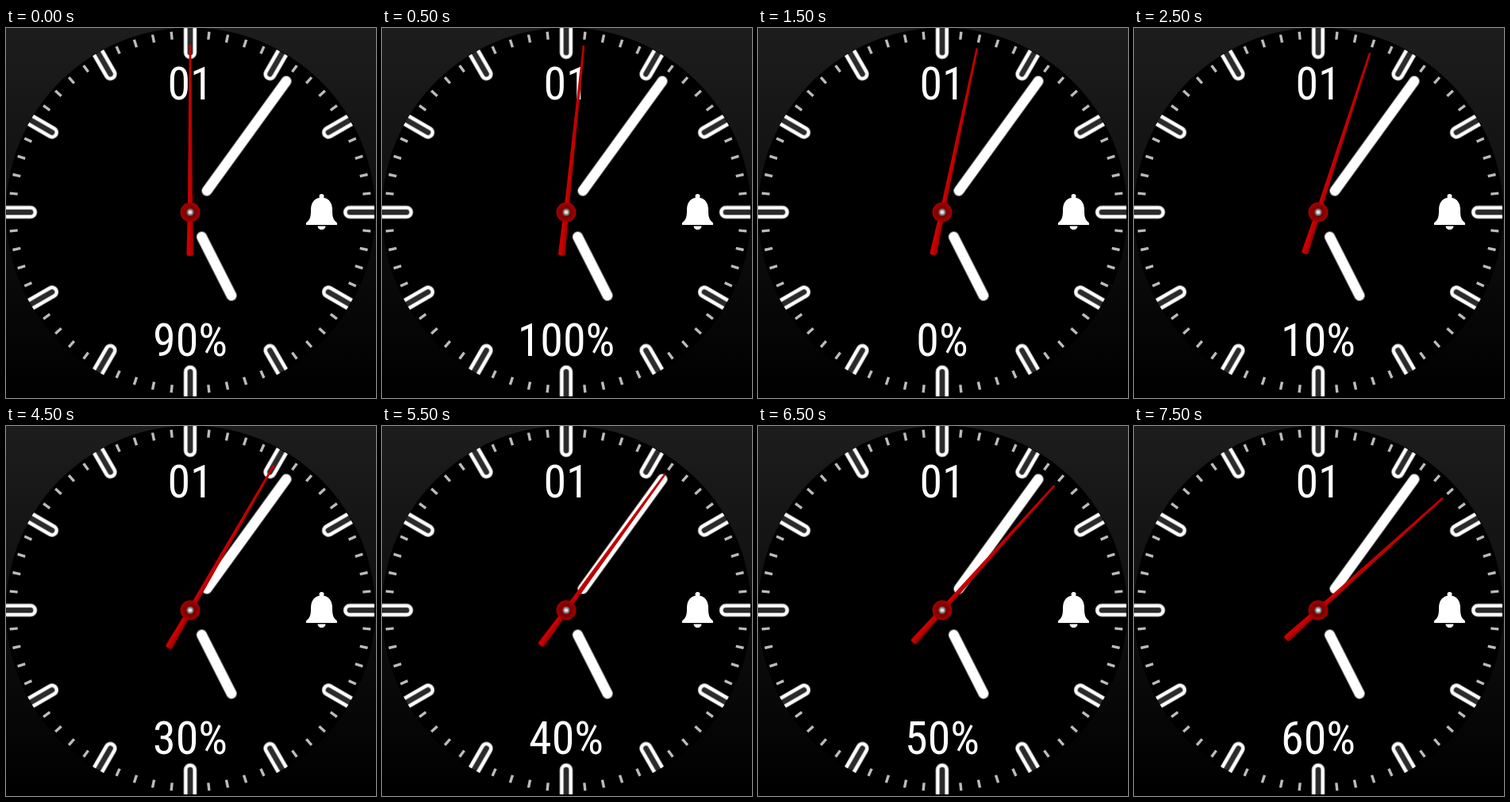
An HTML page for the animation above (8000 ms loop, 466 px wide and 466 px high).

```html
<!DOCTYPE html>
<html lang="en">
<head>
<meta charset="utf-8">
<title>Watch face</title>
<style>
  html, body { margin: 0; width: 100%; height: 100%; overflow: hidden; background: #000; }
  svg { display: block; width: 100%; height: 100%; }
  text {
    font: 400 58px "Roboto Condensed", Roboto, sans-serif;
    font-stretch: condensed;
    fill: #fff;
    text-anchor: middle;
  }
</style>
</head>
<body>
<svg viewBox="0 0 466 466">
  <defs>
    <linearGradient id="backdrop" x2="0" y2="1">
      <stop stop-color="#1d1d1d"/><stop offset="1" stop-color="#000"/>
    </linearGradient>
    <linearGradient id="steel">
      <stop stop-color="#d00000"/><stop offset=".5" stop-color="#c40000"/><stop offset="1" stop-color="#8a0000"/>
    </linearGradient>
    <radialGradient id="hub">
      <stop stop-color="#700"/><stop offset=".55" stop-color="#800000"/><stop offset="1" stop-color="#a80000"/>
    </radialGradient>
    <clipPath id="rim"><circle r="232"/></clipPath>
    <path id="hands" d="M21-27L121-165M14.500 31L52 105" stroke-linecap="round"/>
    <path id="hour" d="M-5.700-236V-201A5.700 5.700 0 0 0 5.700-201V-236"/>
  </defs>
  <rect width="466" height="466" fill="url(#backdrop)"/>
  <g transform="translate(232 232)">
    <circle cx=".5" r="232.500"/>
    <g id="marks" clip-path="url(#rim)"></g>
    <text y="-142.500">01</text>
    <text id="battery" y="181"></text>
    <g transform="translate(165.5 0)" fill="#fff">
      <circle cy="-20" r="3"/>
      <path d="M-19.500 16V13.500C-14 9-13.500 5-13.500-3C-13.500-13-8-18.500 0-18.500S13.500-13 13.500-3C13.500 5 14 9 19.500 13.500V16Z"/>
      <path d="M-5 17.500H5A5 4.500 0 0 1-5 17.500Z"/>
    </g>
    <use href="#hands" stroke="#777" stroke-width="14"/>
    <use href="#hands" stroke="#fff" stroke-width="12"/>
    <path id="second" d="M-1.300-211H1.300L3-10L4.500 52Q4.500 55 2 55H-2Q-4.500 55-4.500 52L-3-10Z" fill="url(#steel)"/>
    <circle r="12.500" fill="url(#hub)"/>
    <circle r="4.500" fill="#777"/>
    <circle r="2.500" fill="#ddd"/>
  </g>
</svg>
<script>
  const $ = id => document.getElementById(id);
  const LOOP = 8000;

  let marks = '';
  for (let i = 0; i < 60; i++) {
    const shape = i % 5
      ? '<path d="M0-228.500V-218.500" stroke="#bbb" stroke-width="3.400"/>'
      : `<use href="#hour" fill="#2a2a2a" stroke="#888" stroke-width="5.600"/>
         <use href="#hour" fill="none" stroke="#fff" stroke-width="3.800"/>`;
    marks += `<g transform="rotate(${i * 6})">${shape}</g>`;
  }
  $('marks').innerHTML = marks;

  function draw(now) {
    // The hand ticks half a second into the loop, then once per second.
    const tick = Math.floor((now % LOOP + 500) / 1000);
    $('second').setAttribute('transform', `rotate(${tick * 6})`);
    $('battery').textContent = (90 + tick * 10) % 110 + '%';
  }

  const start = performance.now();
  function frame() {
    draw(performance.now() - start);
    requestAnimationFrame(frame);
  }
  frame();
</script>
</body>
</html>
```
